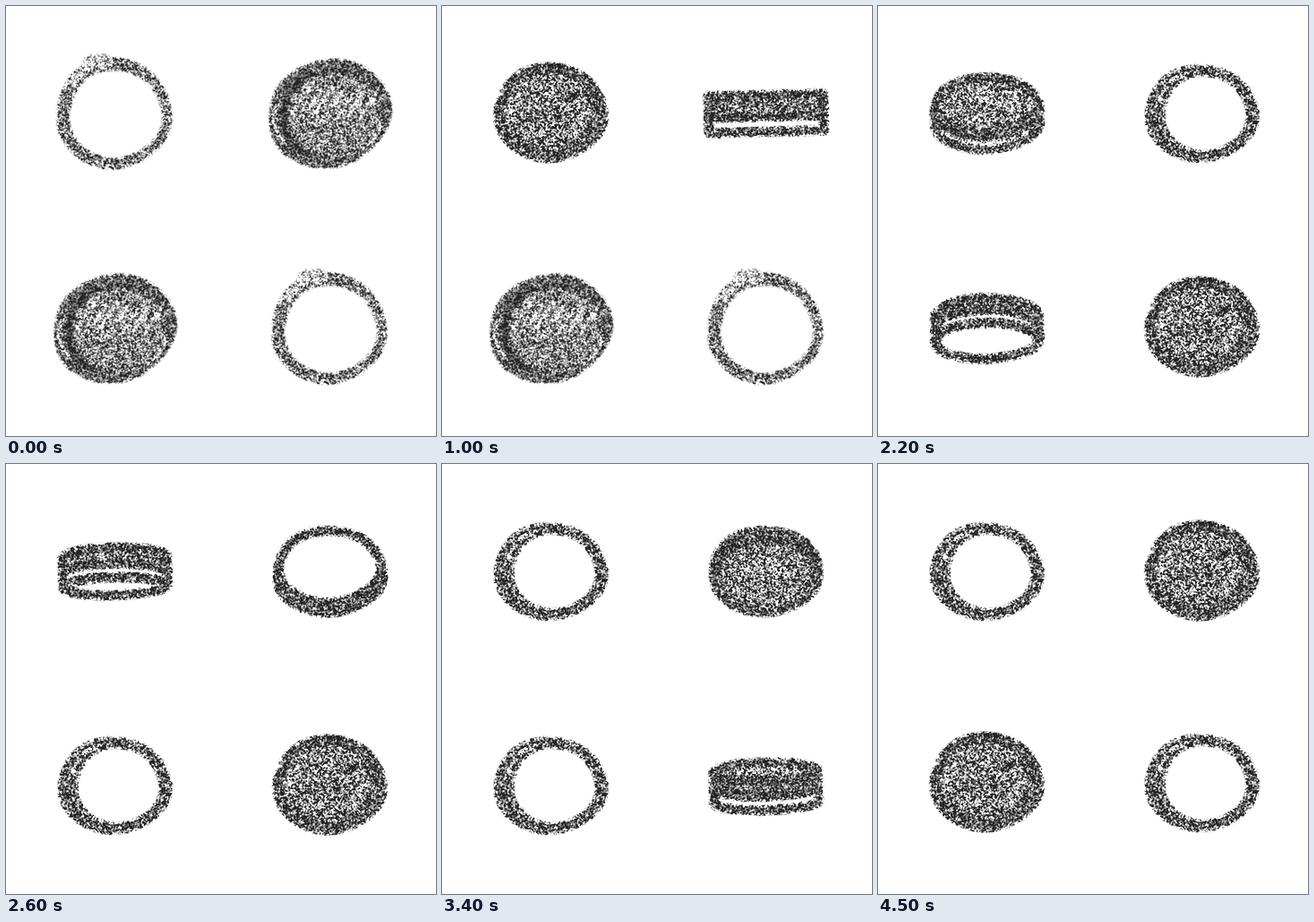
Write an HTML page with a canvas that moves like this. It is 480x480 px and loops after 4.6 s.

```html
<!DOCTYPE html>
<html>
<head>
<meta charset="utf-8">
<style>
html, body { margin: 0; height: 100%; overflow: hidden; background: #fff; }
canvas { display: block; }
</style>
</head>
<body>
<canvas id="stage" width="480" height="480"></canvas>
<script>
const stage = document.getElementById('stage').getContext('2d');
const S = 160, STEP = 100, STEPS = 46;
const SOFT = 1.2, ROUGH = 1.8;
const pad = document.createElement('canvas');
pad.width = pad.height = S;
const g = pad.getContext('2d', { willReadFrequently: true });

// x, y, step at which the first flip is edge-on, starts black
const discs = [
  [121, 120, 5, false], [361, 120, 10, true],
  [361, 360, 15, false], [121, 360, 20, true]
];

const ink = v => `rgb(${v * 255},${v * 255},${v * 255})`;

// Slightly uneven hand-drawn arc, appended to the current path
function arc(x, y, rx, ry, from = 0, to = Math.PI * 2) {
  for (let i = 0; i <= 60; i++) {
    const a = from + (to - from) * i / 60;
    const w = 1 + .014 * Math.sin(3 * a + 1) + .009 * Math.sin(5 * a);
    g.lineTo(x + rx * w * Math.cos(a), y + ry * w * Math.sin(a));
  }
}

function fill(v, ...shape) {
  g.beginPath();
  arc(...shape);
  g.fillStyle = ink(v);
  g.fill();
}

function line(v, width, ...shape) {
  g.beginPath();
  arc(...shape);
  g.strokeStyle = ink(v);
  g.lineWidth = width;
  g.stroke();
}

function streaks(v, x, y, rx, ry) {
  g.strokeStyle = ink(v);
  g.lineWidth = 3;
  for (let i = -3; i <= 3; i++) {
    const u = x + i * rx * .24, w = y - ry * (.3 - .06 * (i % 2));
    g.beginPath();
    g.moveTo(u - rx * .2, w + ry * .32);
    g.lineTo(u + rx * .2, w - ry * .32);
    g.stroke();
  }
}

function firstBlack() {
  g.save();
  g.rotate(-.3);
  fill(.78, 0, 0, 69, 60);
  g.restore();
  line(.35, 5, -1, 2, 61, 50, 2.5, 3.5);
  line(.95, 7, 5, 2, 57, 50, 2, 4.3);
  fill(.58, 6, 3, 52, 47);
  line(.35, 3, 4, 3, 54, 46, .1, .9);
  streaks(.12, 5, 3, 52, 47);
}

function firstWhite() {
  line(.2, 8, -18, -56, 14, 7, 3, 6);
  fill(.64, -1, 0, 64, 62);
  line(.25, 11, -1, 0, 59, 57, 3.7, 4.7);
  fill(0, 1, 1, 52, 49);
}

function restBlack() {
  fill(.62, 0, -1, 63, 55);
  line(.84, 12, 0, -1, 57, 49);
  line(.76, 10, 0, -1, 48, 42, -.5, 1.2);
}

function restWhite() {
  fill(.8, 0, 0, 63, 54);
  line(.4, 5, 2, 0, 53, 47, 3.3, 4.4);
  fill(0, 4, 0, 46, 42);
}

// Tilted disc: a squashed face plus a two-tone rim above or below it
function tilted(d, black, wide) {
  const c = Math.abs(d) / 5, side = d < 0 ? -1 : 1;
  const rx = wide ? 64 : 58, ry = (wide ? 56 : 50) * c;
  const depth = (wide ? 41 : 36) * (1 - c ** 1.6);
  const face = side * depth / 2;
  const mid = (10 * c - 3) * (black ? side : -side);
  const from = side < 0 ? 0 : Math.PI, to = from + Math.PI;
  const slab = (y0, y1, v) => {
    g.beginPath();
    arc(0, y0, rx, ry, from, to);
    arc(0, y1, rx, ry, to, from);
    g.closePath();
    g.fillStyle = ink(v);
    g.fill();
    g.strokeStyle = ink(.86);
    g.lineWidth = 9.5;
    g.stroke();
  };
  g.rotate(-.025);
  slab(face, mid, black ? .76 : 0);
  slab(mid, -face, black ? 0 : .7);
  if (!c) return;
  fill(black ? .62 : 0, 0, face, rx, ry);
  if (black) streaks(.4, 0, face, rx * .8, ry * .8);
  line(.86, 9.5, 0, face, rx - 1, ry);
}

// Turns the density on the pad into charcoal grain
function grain(seed, rough) {
  let s = seed * 7919 + 12345 >>> 0;
  const r = Array.from({ length: S * S + S + 1 }, () => {
    s = Math.imul(s, 1664525) + 1013904223 >>> 0;
    return s / 2 ** 32;
  });
  const img = g.getImageData(0, 0, S, S), p = img.data;
  for (let i = 0; i < S * S; i++) {
    const m = p[4 * i] / 255;
    const n = ((r[i] + r[i + 1] + r[i + S] + r[i + S + 1]) / 4 - .5) * 1.9;
    const a = m * .92 + n * rough * (1.5 - m) * Math.min(1, m * 3);
    p[4 * i] = p[4 * i + 1] = p[4 * i + 2] = 255 - 220 * Math.max(0, Math.min(1, a));
  }
  g.putImageData(img, 0, 0);
}

function sketch(seed, rough, draw) {
  g.setTransform(1, 0, 0, 1, 0, 0);
  g.filter = 'none';
  g.fillStyle = '#000';
  g.fillRect(0, 0, S, S);
  g.translate(S / 2, S / 2);
  g.lineJoin = 'round';
  g.filter = 'blur(1.3px)';
  draw();
  grain(seed, rough);
}

function drawDisc([x, y, edge, startBlack], k) {
  const second = k > edge + 10;
  const d = k - edge - (second ? 20 : 0);
  const black = (d >= 0) !== (startBlack !== second);
  const low = y > 240;
  if (Math.abs(d) < 5) {
    const wide = !second && d < (black ? 3 : 2);
    sketch(20 + d + black * 30 + second * 60, ROUGH, () => tilted(d, black, wide));
  } else if (!second && d < 0) {
    sketch(1 + startBlack, SOFT, startBlack ? firstBlack : firstWhite);
  } else {
    sketch(3 + black, ROUGH, black ? restBlack : restWhite);
    if (low) y -= second && d > 0 ? 4 : 1;
  }
  stage.drawImage(pad, x - S / 2, y - S / 2);
}

let last = -1;
const begin = performance.now();
function tick() {
  const k = Math.floor((performance.now() - begin) / STEP) % STEPS;
  if (k !== last) {
    last = k;
    stage.fillStyle = '#fff';
    stage.fillRect(0, 0, 480, 480);
    for (const disc of discs) drawDisc(disc, k);
  }
  requestAnimationFrame(tick);
}
tick();
</script>
</body>
</html>
```
